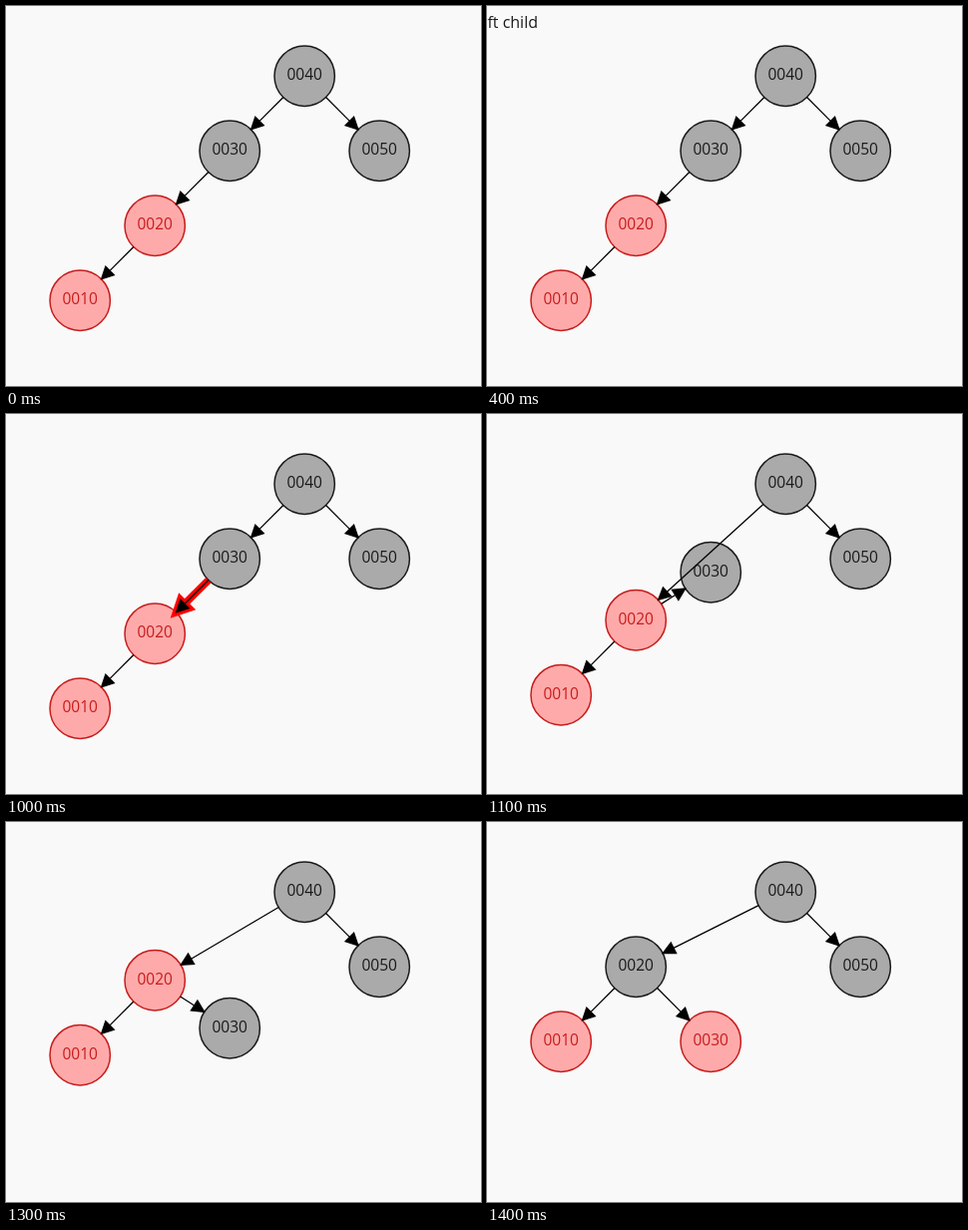
An HTML page with a canvas that plays this animation: 476 px wide and 381 px high, repeating every 2300 ms.

```html
<!DOCTYPE html>
<html lang="en">
<head>
<meta charset="utf-8">
<title>Tree rotation</title>
<style>
html, body { margin: 0; width: 476px; height: 381px; overflow: hidden; background: #f9f9f9; }
canvas { display: block; }
</style>
</head>
<body>
<canvas id="stage" width="476" height="381"></canvas>
<script>
const ctx = document.getElementById('stage').getContext('2d');
const LOOP = 2300, R = 30.2, GAP = 75;
const FAMILY = '"Open Sans", "Noto Sans", sans-serif';
const GRAY = { fill: '#aaaaaa', ink: '#1a1a1a' };
const RED = { fill: '#ffaaaa', ink: '#c81c1c' };

// Vertical shift of the rotating nodes after each 100 ms step
const SHIFTS = [13.5, 34, 61.5, GAP];

function text(str, x, y, size, align, color) {
  ctx.font = `${size}px ${FAMILY}`;
  ctx.textAlign = align;
  ctx.fillStyle = color;
  ctx.fillText(str, x, y);
}

function node(label, p, style) {
  ctx.beginPath();
  ctx.arc(p.x, p.y, R, 0, Math.PI * 2);
  ctx.fillStyle = style.fill;
  ctx.fill();
  ctx.lineWidth = 1.5;
  ctx.strokeStyle = style.ink;
  ctx.stroke();
  text(label, p.x, Math.floor(p.y + 4.7), 15.5, 'center', style.ink);
}

function arrow(a, b, width, color) {
  const len = Math.hypot(b.x - a.x, b.y - a.y);
  const ux = (b.x - a.x) / len, uy = (b.y - a.y) / len;
  const x = b.x - ux * R, y = b.y - uy * R;
  const bx = x - ux * 12, by = y - uy * 12;
  ctx.lineWidth = width;
  ctx.strokeStyle = ctx.fillStyle = color;
  ctx.beginPath();
  ctx.moveTo(a.x + ux * R, a.y + uy * R);
  ctx.lineTo(bx, by);
  ctx.stroke();
  ctx.beginPath();
  ctx.moveTo(x, y);
  ctx.lineTo(bx - uy * 6, by + ux * 6);
  ctx.lineTo(bx + uy * 6, by - ux * 6);
  ctx.closePath();
  ctx.fill();
  ctx.stroke();
}

function edge(a, b, glow = 0) {
  if (glow) arrow(a, b, glow, '#ff0000');
  arrow(a, b, 1.3, '#000000');
}

function draw(t) {
  const step = Math.floor(t / 100);
  const rotating = step >= 11, done = step >= 14;
  const d = rotating ? SHIFTS[Math.min(step - 11, 3)] : 0;
  const at = (col, row, shift = 0) => ({ x: 74.2 + col * GAP, y: 70.2 + row * GAP + shift });
  const n10 = at(0, 3, -d);
  const n20 = at(1, 2, -d);
  const n30 = at(2, 1, d);
  const n40 = at(3, 0);
  const n50 = at(4, 1);

  ctx.fillStyle = '#f9f9f9';
  ctx.fillRect(0, 0, 476, 381);

  if (step >= 4 && step < 7) text('left child', 51, 22, 16, 'right', '#1a1a1a');

  node('0010', n10, RED);
  node('0020', n20, done ? GRAY : RED);
  node('0030', n30, done ? RED : GRAY);
  node('0040', n40, GRAY);
  node('0050', n50, GRAY);

  edge(n40, n50);
  edge(n20, n10);
  if (rotating) {
    edge(n40, n20);
    edge(n20, n30);
  } else {
    const glow = step >= 7 ? 6 + (step - 7) * 0.5 : 0;
    edge(n40, n30);
    edge(n30, n20, glow);
  }
}

const start = performance.now();
function tick() {
  draw((performance.now() - start) % LOOP);
  requestAnimationFrame(tick);
}
tick();
</script>
</body>
</html>
```
